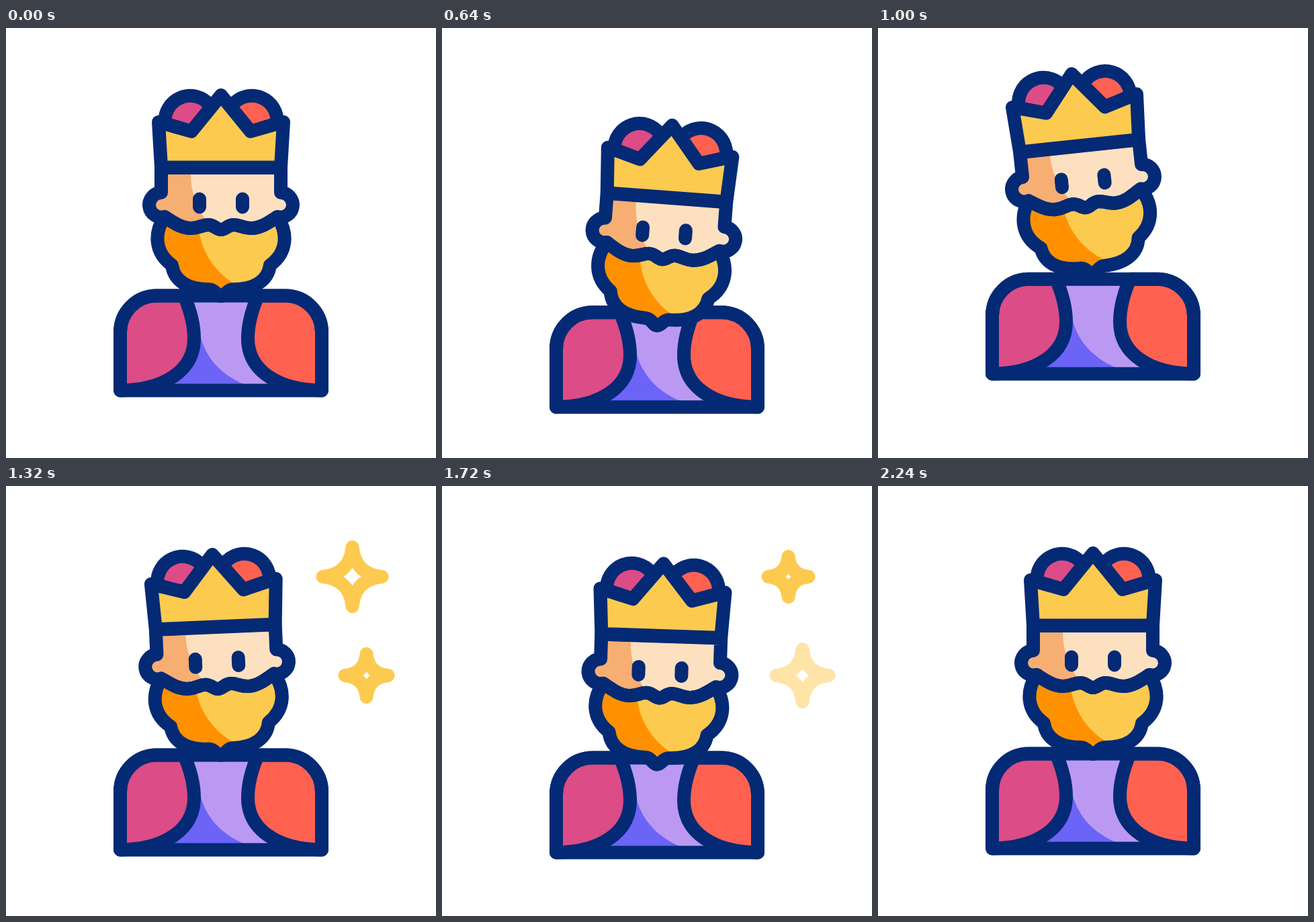
Write an HTML page that moves like this. It is 640 px wide and 640 px high and loops after 2.4 s.

```html
<!DOCTYPE html>
<html lang="en">
<head>
<meta charset="utf-8">
<title>King</title>
<style>
  html, body { margin: 0; width: 100%; height: 100%; overflow: hidden; background: #fff; }
  svg { display: block; width: 100vw; height: 100vh; }
  .line { stroke: #042a75; stroke-width: 20; stroke-linejoin: round; stroke-linecap: round; }
  .star { fill: none; stroke: #fdca50; stroke-width: 20; stroke-linejoin: round; }
</style>
</head>
<body>
<svg viewBox="0 0 640 640">
  <defs>
    <clipPath id="faceShade"><path d="M190 200H275V217C275 245 284 272 304 294V310H190Z"/></clipPath>
    <clipPath id="beardShade"><path d="M190 270H287V300C291 332 310 364 344 383V420H190Z"/></clipPath>
    <path id="face"/>
    <path id="beard"/>
    <path id="torso" d="M170 539.5V453A54 54.5 0 0 1 224 398.5H416A54 54.5 0 0 1 470 453V539.5Z"/>
    <path id="sleeve" d="M265 398.5C276 424 280 442 280 462C280 510 235 539 170 539.5V453A54 54.5 0 0 1 224 398.5Z"/>
    <path id="lobe" d="M236.7 142A37.5 37.5 0 0 1 303 114.5L306 117L276 154Z"/>
  </defs>

  <g id="body">
    <use href="#torso" fill="#bb99f3"/>
    <path d="M286 440C290 482 314 514 356 531V539H220Z" fill="#6c64f7"/>
    <use href="#sleeve" class="line" fill="#dc4c86"/>
    <use href="#sleeve" class="line" fill="#ff6151" transform="matrix(-1 0 0 1 640 0)"/>
    <use href="#torso" class="line" fill="none"/>
  </g>

  <g id="head">
    <use href="#lobe" class="line" fill="#dc4c86"/>
    <use href="#lobe" class="line" fill="#ff6151" transform="matrix(-1 0 0 1 640 0)"/>
    <use href="#face" fill="#fde0bf"/>
    <g clip-path="url(#faceShade)"><use href="#face" fill="#f7ae73"/></g>
    <use href="#beard" fill="#fdca50"/>
    <g clip-path="url(#beardShade)"><use href="#beard" fill="#ff9100"/></g>
    <use href="#face" class="line" fill="none"/>
    <use href="#beard" class="line" fill="none"/>
    <path class="line" d="M227 140L276 154L320 100L364 154L413 140L409 207.5H231Z" fill="#fdca50"/>
    <path class="line" d="M288 254.5V266.5M352 254.5V266.5"/>
  </g>

  <path id="star1" class="star"/>
  <path id="star2" class="star"/>
</svg>
<script>
const $ = id => document.getElementById(id);

const moustache = 'C250 290 261 298 275 298C288 298 291 293 301 293C310 293 313 300 320 300' +
  'S330 293 339 293C349 293 352 298 365 298C379 298 390 290 404 281';
$('face').setAttribute('d', 'M231 208V245A18.3 18.3 0 1 0 236 281' + moustache +
  'A18.3 18.3 0 1 0 409 245V208Z');
$('beard').setAttribute('d', 'M236 281' + moustache +
  'C420 305 419 334 393 353C390 376 370 389 338 389C328 389 327 399 320 399' +
  'S312 389 302 389C270 389 250 376 247 353C221 334 220 305 236 281Z');

// Smooth 0 to 1 as t goes from a to b.
function ease(t, a, b) {
  const u = Math.min(1, Math.max(0, (t - a) / (b - a)));
  return u * u * (3 - 2 * u);
}

// Swing from rest through three extremes and back to rest.
function swing(t, times, ...peaks) {
  const stops = [0, ...peaks, 0];
  return peaks.concat(0).reduce((v, p, i) => v + (p - stops[i]) * ease(t, times[i], times[i + 1]), 0);
}

const bodyTimes = [200, 600, 1040, 1480, 1920];
const headTimes = [270, 690, 1065, 1580, 2150];

function drawStar(id, x, y, t, born, grown, last, fade) {
  const r = grown * ease(t, born, 1320) + (last - grown) * ease(t, 1320, 1720);
  const c = r / 11;
  const star = $(id);
  star.setAttribute('d', `M0 ${-r}Q${c} ${-c} ${r} 0Q${c} ${c} 0 ${r}Q${-c} ${c} ${-r} 0Q${-c} ${-c} 0 ${-r}Z`);
  star.setAttribute('transform', `translate(${x} ${y})`);
  star.setAttribute('opacity', ease(t, born, born + 40) - ease(t, fade, fade + 160));
}

function draw(now) {
  const t = Math.floor(now % 2400 / 40) * 40;
  const y = swing(t, bodyTimes, 26, -26, 14);
  const nod = swing(t, headTimes, 20, -11, 11);
  const tilt = swing(t, headTimes, 4.5, -7, 2.2);
  $('body').setAttribute('transform', `translate(0 ${y})`);
  $('head').setAttribute('transform', `translate(0 ${y + nod}) rotate(${tilt} 320 400)`);
  drawStar('star1', 515.5, 135, t, 1040, 44, 30, 1740);
  drawStar('star2', 536.5, 282, t, 1060, 32, 39, 1640);
}

const start = performance.now();
function loop() {
  draw(performance.now() - start);
  requestAnimationFrame(loop);
}
loop();
</script>
</body>
</html>
```
